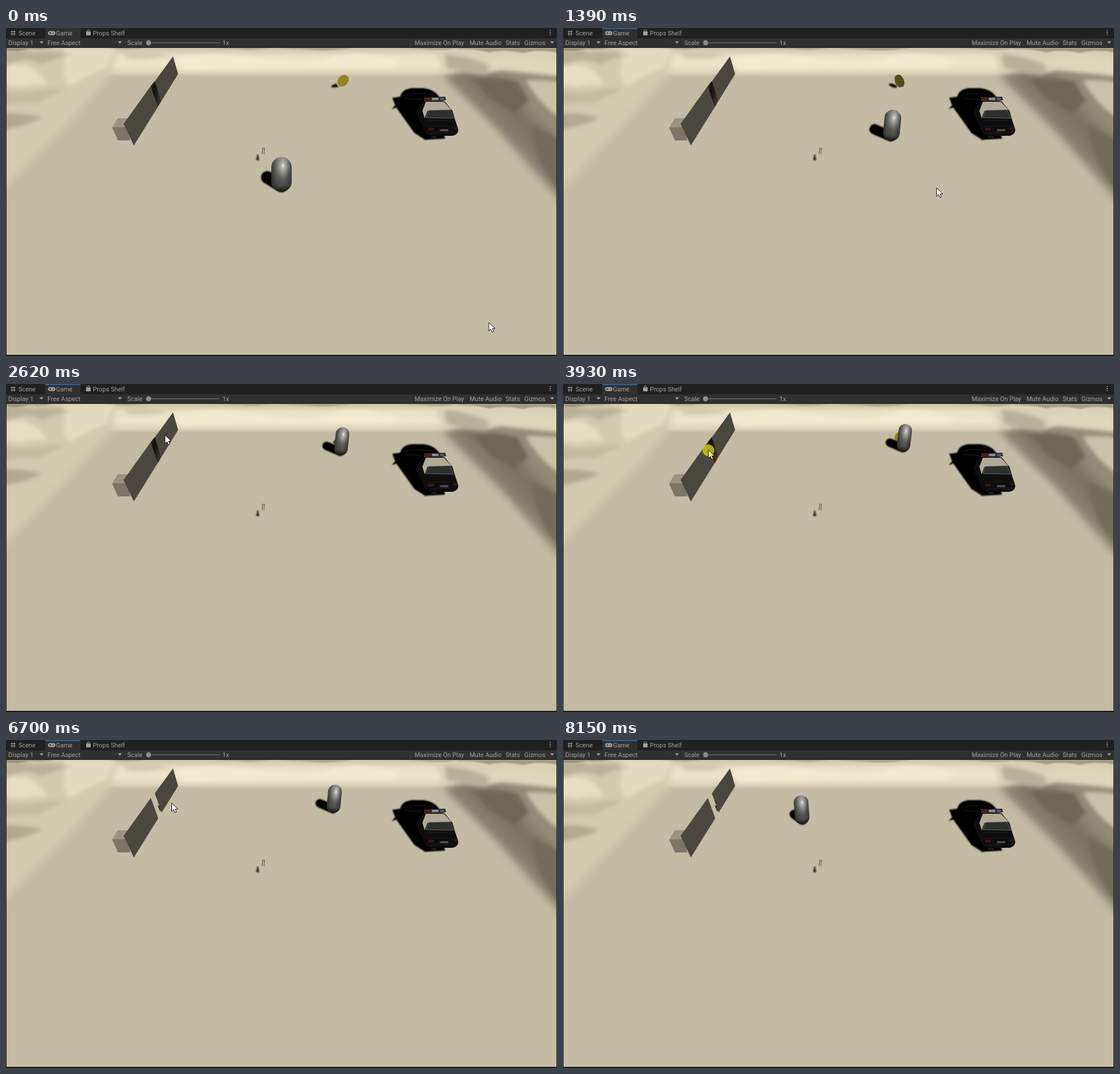
An HTML page that plays this animation: 970 by 578 pixels, repeating every 8310 ms.

```html
<!DOCTYPE html>
<html lang="en">
<head>
<meta charset="utf-8">
<title>Game view</title>
<style>
html, body { margin: 0; width: 100%; height: 100%; overflow: hidden; background: #202020; }
svg { display: block; width: 970px; height: 578px; }
text { font: 11px Roboto, "Liberation Sans", sans-serif; fill: #a0a0a0; }
</style>
</head>
<body>
<svg viewBox="0 0 970 578">
  <defs>
    <clipPath id="view"><rect x="1" y="35" width="968" height="541"/></clipPath>
    <clipPath id="above"><path d="M240 60H290V100L274 128L267 143H240Z"/></clipPath>
    <filter id="b1" filterUnits="userSpaceOnUse" x="0" y="0" width="970" height="578"><feGaussianBlur stdDeviation=".8"/></filter>
    <filter id="b3" filterUnits="userSpaceOnUse" x="-40" y="0" width="1050" height="400"><feGaussianBlur stdDeviation="3.500"/></filter>
    <filter id="b7" filterUnits="userSpaceOnUse" x="-60" y="-20" width="1100" height="460"><feGaussianBlur stdDeviation="7"/></filter>
    <linearGradient id="far" x2="0" y2="1">
      <stop stop-color="#cbc3a8"/><stop offset=".28" stop-color="#e9e1c5"/>
      <stop offset=".6" stop-color="#eee6ca"/><stop offset=".86" stop-color="#ddd4b8"/>
      <stop offset="1" stop-color="#c3bba3"/>
    </linearGradient>
    <linearGradient id="slope" gradientUnits="userSpaceOnUse" x1="832" y1="185" x2="905" y2="115">
      <stop stop-color="#b3ab95"/><stop offset=".3" stop-color="#8a8371"/>
      <stop offset=".7" stop-color="#777161"/><stop offset="1" stop-color="#938b77"/>
    </linearGradient>
    <linearGradient id="side">
      <stop stop-color="#3a3a38"/><stop offset=".25" stop-color="#666663"/>
      <stop offset=".6" stop-color="#7b7b77"/><stop offset="1" stop-color="#454542"/>
    </linearGradient>
    <linearGradient id="low" x2="0" y2="1">
      <stop offset=".3" stop-color="#1c1c1b" stop-opacity="0"/>
      <stop offset=".8" stop-color="#1c1c1b" stop-opacity=".45"/>
      <stop offset="1" stop-color="#0c0c0c" stop-opacity=".95"/>
    </linearGradient>
    <radialGradient id="shine" cx=".57" cy=".25" r=".4">
      <stop stop-color="#fff7e6"/><stop offset=".18" stop-color="#c8c5bd" stop-opacity=".8"/>
      <stop offset="1" stop-color="#92928e" stop-opacity="0"/>
    </radialGradient>
    <linearGradient id="doorFill" x2="1" y2=".25">
      <stop stop-color="#3b3832"/><stop offset=".3" stop-color="#12110e"/>
      <stop offset=".55" stop-color="#191712"/><stop offset="1" stop-color="#3d3932"/>
    </linearGradient>
  </defs>

  <rect width="970" height="578" fill="#202020"/>
  <rect x="69" width="62" height="17" fill="#303030"/>
  <rect id="focus" x="69" width="62" height="2" fill="#2e5f96"/>
  <rect y="17" width="970" height="17" fill="#303030"/>
  <path d="M0 17.500H69M131 17.500H970" stroke="#1a1a1a"/>
  <path d="M69.500 18V34M207.500 18V34M717.500 18V34M814.500 18V34M876.500 18V34M908.500 18V34" stroke="#262626"/>
  <g>
    <text x="22" y="13">Scene</text><text x="88" y="13">Game</text>
    <text x="153" y="13">Props Shelf</text>
    <text x="4" y="30">Display 1</text><text x="73" y="30">Free Aspect</text>
    <text x="213.500" y="30">Scale</text><text x="381" y="30">1x</text>
    <text x="719.500" y="30">Maximize On Play</text><text x="816" y="30">Mute Audio</text>
    <text x="879.500" y="30">Stats</text><text x="912.500" y="30">Gizmos</text>
  </g>
  <g fill="#a0a0a0">
    <path d="M59 23.500h7l-3.500 4zM197 23.500h7l-3.500 4zM958 23.500h7l-3.500 4z"/>
    <circle cx="958" cy="4.500" r="1"/><circle cx="958" cy="8" r="1"/><circle cx="958" cy="11.500" r="1"/>
    <path d="M10.500 4v10M14.500 4v10M8 6.500h9M8 10.500h9" stroke="#a0a0a0" fill="none"/>
    <rect x="74" y="5.500" width="13" height="7" rx="3.500"/>
    <path d="M76 9h4M78 7v4" stroke="#303030"/><circle cx="83.500" cy="9" r="1" fill="#303030"/>
    <rect x="141" y="6" width="8" height="7" rx="1"/>
    <path d="M143 6V5q0-2 2-2t2 2v1" fill="none" stroke="#a0a0a0"/>
  </g>
  <path d="M251 26H376" stroke="#585858" stroke-width="2"/>
  <circle cx="251" cy="26" r="4.500" fill="#8c8c8c"/>

  <rect y="34" width="970" height="544" fill="#151515"/>
  <g clip-path="url(#view)">
    <rect y="34" width="970" height="544" fill="#c3bba3"/>
    <rect x="150" y="35" width="640" height="51" fill="url(#far)"/>
    <g filter="url(#b7)">
      <path d="M-40 10H195L186 82L110 166L-40 322Z" fill="#d3cbaf"/>
      <path d="M768 84L850 60L1010 60V345L960 288L870 185Z" fill="url(#slope)"/>
    </g>
    <g filter="url(#b3)">
      <path d="M100 35H192L178 70Q140 84 112 103Q96 84 104 62Z" fill="#e3dbbf"/>
      <path d="M-10 36Q22 34 45 43Q80 39 118 47Q82 53 65 64Q40 52 22 58L-10 66Z" fill="#aca48d" opacity=".65"/>
      <path d="M-10 72Q20 60 40 68Q62 78 72 100Q40 98 25 104L-10 98Z" fill="#e6dec2"/>
      <path d="M-10 109Q24 116 52 111Q88 104 105 109Q75 119 56 133Q30 128 -10 137Z" fill="#bdb59d" opacity=".7"/>
      <path d="M-10 151Q30 148 63 158Q42 171 -10 180Z" fill="#a69e88" opacity=".75"/>
      <path d="M200 35Q245 37 290 48Q250 57 215 54Z" fill="#d2caaf"/>
      <path d="M295 55Q365 40 450 54T570 53T690 57L680 70Q500 68 310 74Z" fill="#f2eace"/>
      <path d="M752 35H1000V62L900 68L848 80L770 78Z" fill="#d9d1b5"/>
      <path d="M772 46Q806 46 850 66L846 84Q806 82 776 70Z" fill="#b8b099"/>
      <path d="M850 56Q900 46 940 55L1000 62V88Q925 80 862 74Z" fill="#ded6ba"/>
      <path d="M915 92Q950 90 1000 98V172Q945 146 915 92Z" fill="#cac2a8"/>
      <path d="M822 90Q868 86 900 94L920 128L896 150L852 124Z" fill="#6d6757"/>
      <path d="M925 172Q960 184 1000 214V318L962 270Q928 225 925 172Z" fill="#726c5c"/>
    </g>
    <g filter="url(#b1)" fill="#978f79">
      <path d="M0 35H86Q58 39 42 37Q17 42 0 39Z"/>
      <path d="M168 35H245Q222 39 203 37ZM365 35H470Q430 40 410 37ZM475 35H610Q565 42 530 38ZM690 35H800Q766 42 735 37Z" opacity=".65"/>
      <path d="M795 35H970V43Q938 37 910 44Q878 37 850 43Q830 37 795 37Z" opacity=".8"/>
    </g>

    <path d="M197 159H224L214 176L219 198H197L187 176Z" fill="#7d7569"/>
    <path d="M197 159H224L214 175H187Z" fill="#9a9182"/>
    <path id="stub" d="M267 115.500L270 116L273 125L271 125Z" fill="#27241e"/>
    <path d="M255 102L268 138L225 207L207 169ZM294 50L303 81L274 128L262 94Z" fill="#4a473f"/>
    <g id="door" clip-path="url(#above)">
      <g id="panel">
        <path d="M254.500 102.500L262 93.500L274 128L267.500 139Z" fill="url(#doorFill)"/>
        <path id="rust" d="M268 120L272 130L267 140L263 130Z" fill="#4b2a1a"/>
      </g>
    </g>

    <g fill="none" stroke="#4a463c">
      <path d="M452 211L451 221M455 211L454 221"/>
      <path d="M451 212h5M450 221.500h2M453.500 222h2" stroke="#7a7361"/>
    </g>
    <path d="M442 223h2l1 6 1 3-3 1.500-3-2 1.500-3z" fill="#27241c" filter="url(#b1)"/>

    <g id="car">
      <path d="M680 123L694 121Q697 108 714 106H735Q752 108 760 118L772 133L745 160L746 188H771L773 195L738 197L719 185L687 140L679 143L685 136Z" fill="#050505" filter="url(#b1)"/>
      <path d="M700 119Q723 112 754 119M702 124L734 126" fill="none" stroke="#211c1c"/>
      <path d="M722 150Q726 134 741 129H772L786 146L790 160L796 178Q797 188 785 190H751Q736 188 734 174Z" fill="#0d0d0d"/>
      <path d="M739 130H771L784 144L742 146L737 159L733 146Z" fill="#b1a997"/>
      <path d="M744 145L782 144L788 159L739 158Z" fill="#2c302e" stroke="#9b9486" stroke-width=".6"/>
      <path d="M736 122L773 121L775 127L765 129H736Z" fill="#2d3038"/>
      <path d="M736 122H749L748 128H736Z" fill="#452120"/>
      <path d="M750 123H761V127H750Z" fill="#968f85"/>
      <path d="M765 123H771V127H764Z" fill="#4c5a72"/>
      <path d="M739 163H790M743 173L794 172M746 185L794 183" stroke="#1e1e1e"/>
      <path d="M743 176H753V180L744 181ZM787 175L795 174V179H788Z" fill="#3c1512"/>
      <path d="M764 178H779V182H763Z" fill="#3e3c39"/>
      <path d="M766 180h11" stroke="#888378" stroke-dasharray="2 1"/>
      <path d="M749 192h9M735 197h6" stroke="#5b5548"/>
    </g>

    <g id="coin">
      <ellipse id="coinShade" cx="581" cy="101.500" rx="9" ry="3" fill="#080705" filter="url(#b1)"/>
      <circle id="rim" r="11"/><circle id="face" r="11"/>
    </g>
    <path id="shade" stroke="#040404" stroke-linecap="round" fill="none" filter="url(#b1)"/>
    <g id="capsule">
      <rect fill="url(#side)"/><rect fill="url(#low)"/><rect fill="url(#shine)"/>
    </g>
  </g>
  <circle id="click" r="10.500" fill="#c9c21c" opacity=".86"/>
  <path id="cursor" d="M0 0V15L3.500 11.800L6 17L8.600 15.800L6.200 10.800H11Z" fill="#fff" stroke="#111"/>
</svg>
<script>
const LOOP = 8310, STEP = 76.9;
const $ = id => document.getElementById(id);
const set = (el, attrs) => { for (const k in attrs) el.setAttribute(k, attrs[k]); };
const show = (id, on) => { $(id).style.display = on ? "" : "none"; };

// Rows: time, then values
const body = [[0, 485, 258, 36], [500, 485, 258, 36], [1390, 580, 171, 40], [1980, 591, 101, 34],
  [2620, 591, 101, 34], [3450, 601, 95, 33], [3930, 601, 95, 33], [4500, 600, 91, 34],
  [6460, 600, 91, 34], [6700, 577, 104, 33], [8000, 420, 123, 21]];
const mouse = [[0, 850, 519], [230, 850, 519], [840, 720, 345], [1390, 657, 281], [1700, 640, 258],
  [2540, 280, 90], [2700, 280, 90], [3390, 257, 112], [3930, 256, 116], [4300, 256, 116],
  [5000, 262, 113], [6080, 262, 113], [6700, 292, 111], [6850, 335, 95], [7150, 520, 45], [7450, 715, -20]];
const drop = [[0, 0], [3900, 0], [5000, 6], [5230, 40]];

function at(rows, t) {
  const i = rows.findIndex(r => r[0] > t);
  if (i < 0) return rows[rows.length - 1].slice(1);
  const a = rows[i - 1], b = rows[i], k = (t - a[0]) / (b[0] - a[0]);
  return a.slice(1).map((v, j) => v + (b[j + 1] - v) * k);
}

function drawCapsule(t) {
  const [x, y, reach] = at(body, t);
  const w = 24 + (y - 100) * 0.075, h = 49.5 + (y - 100) * 0.073;
  for (const r of $("capsule").children) set(r, { x: -w / 2, y: -h / 2, width: w, height: h, rx: w / 2 });
  set($("capsule"), { transform: `translate(${x} ${y}) rotate(${(x - 485) * 0.06})` });
  const thick = w * 0.62, foot = y + h / 2 - thick / 2 + 1, lean = (x - 485) * 0.025;
  set($("shade"), {
    d: `M${x - reach + thick / 2} ${foot - w * 0.42}L${x - lean} ${foot}`,
    "stroke-width": thick
  });
}

function drawCoin(t) {
  show("coin", t < 4300);
  const a = -0.45 + t * 0.0032, c = Math.cos(a), s = Math.sin(a);
  const side = c < 0 ? -1 : 1, lit = 0.5 + 0.5 * Math.cos(a + 0.45);
  const disc = (x, y) => `matrix(${c} ${s * 0.5} 0 .9 ${x} ${y})`;
  set($("rim"), { transform: disc(593 - 3 * Math.abs(s), 93.8), fill: `hsl(50 30% ${8 + 55 * lit}%)` });
  set($("face"), { transform: disc(593 + Math.abs(s), 93), fill: `hsl(53 64% ${12 + 23 * lit}%)` });
  set($("coinShade"), { rx: 5 + 4 * Math.abs(c), transform: `rotate(${s * side * 26} 581 101.5)` });
}

function drawDoor(t) {
  const [d] = at(drop, t);
  show("door", t < 5230);
  show("rust", t > 3850);
  show("stub", t >= 5230);
  set($("panel"), { transform: `translate(${-d * 0.2} ${d})` });
}

function draw(now) {
  const t = Math.floor((now % LOOP) / STEP + 0.05) * STEP;
  drawCapsule(t);
  drawCoin(t);
  drawDoor(t);
  const [x, y] = at(mouse, t);
  const pressed = t > 3750 && t < 4180;
  set($("cursor"), { transform: `translate(${x} ${y})`, fill: pressed ? "#f5f3a0" : "#fff" });
  set($("click"), { cx: x, cy: y + 1 });
  show("click", pressed);
  show("focus", t > 300);
}

const start = performance.now();
function tick() {
  draw(performance.now() - start);
  requestAnimationFrame(tick);
}
tick();
</script>
</body>
</html>
```
